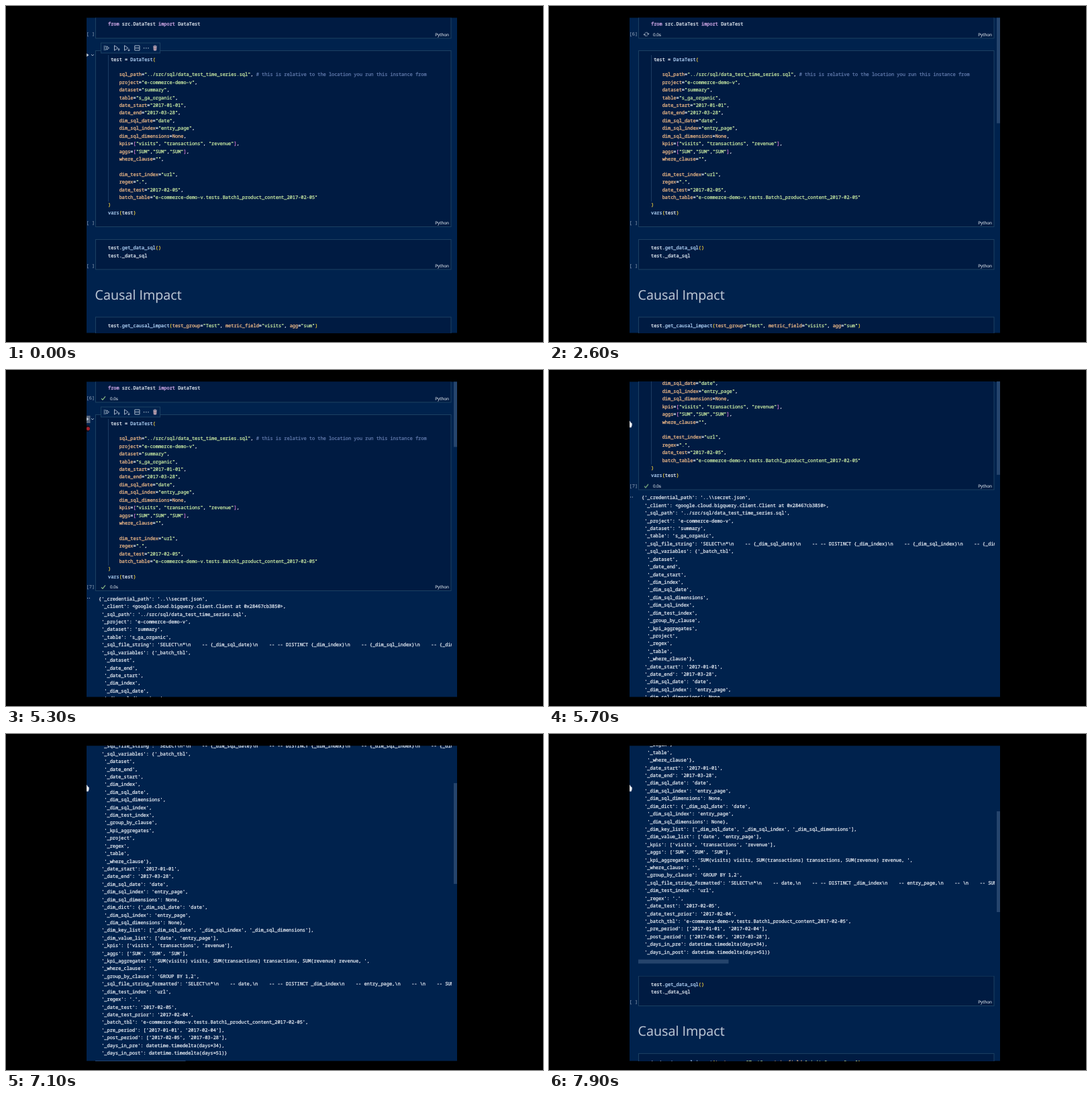
An HTML page for the animation above (8000 ms loop, 800 by 500 pixels).

```html
<!DOCTYPE html>
<html lang="en">
<head>
<meta charset="utf-8">
<title>Notebook run</title>
<style>
@property --n { syntax: "<integer>"; inherits: true; initial-value: 0; }

html, body { margin: 0; width: 100%; height: 100%; overflow: hidden; background: #000; }
svg { display: block; width: 800px; height: 500px; --n: 0; }
text { white-space: pre; text-rendering: geometricPrecision; }

/* a hairline stroke gives the small type its weight */
text, tspan { fill: currentColor; stroke: currentColor; stroke-width: .12; }
.code text, .code tspan { stroke-width: .28; }
.code text, .num { font: 500 6.94px "Noto Sans Mono", "DejaVu Sans Mono", monospace; color: #e1e7f0; }
.num { color: #8394ac; font-weight: 400; }
.ui { font: 6.3px "Open Sans", "Noto Sans", sans-serif; color: #d3dae4; }
.title { font: 19.7px "Open Sans", "Noto Sans", sans-serif; color: #bcc6d4; }
.cell { fill: #001b42; stroke: #1c4062; stroke-width: 1; }
.icon { fill: none; stroke: #b9c5d4; stroke-width: .9; }
.tick { fill: none; stroke: #8fc48a; stroke-width: 1.1; }
.bar { fill: #25446c; }

.kw { color: #dcb0f0; }
.str { color: #c6e6a2; }
.arg { color: #eeb887; }
.fn { color: #b0d0f5; }
.note { color: #5f78aa; }
.paren { color: #e8c93c; }
.brack { color: #cf74cc; }

/* the small negative delay keeps hard changes clear of the 100 ms marks */
.a, svg { animation: 8s step-end -30ms infinite; }
svg { animation-name: scroll; }
.doc { transform: translateY(calc(var(--n) * -30.08px)); }
.thumb { transform: translateY(calc(var(--n) * 8.39px)); }
.hover { animation-name: hover; animation-timing-function: linear; }
.rail { animation-name: rail; animation-timing-function: linear; }
.idle0 { animation-name: idle0; }
.used0 { animation-name: used0; }
.busy0 { animation-name: busy0; }
.done0 { animation-name: done0; }
.idle1 { animation-name: idle1; }
.used1 { animation-name: used1; }
.busy1 { animation-name: busy1; }
.before { animation-name: before; }
.after { animation-name: after; }
.below { animation-name: below; }
.press { animation-name: press; }
.hand { animation-name: hand; }
.mark { animation-name: mark; }
.spin { transform-box: view-box; animation: spin 1s linear infinite; }

@keyframes scroll {
  0% { --n: 0 } 67.5% { --n: 1 } 68.75% { --n: 2 } 70% { --n: 4 } 71.25% { --n: 5 }
  72.5% { --n: 6 } 73.75% { --n: 7 } 78.75% { --n: 8 } 80% { --n: 9 } 81.25% { --n: 10 }
  82.5% { --n: 11 } 83.75% { --n: 12 } 88.75% { --n: 13 } 90% { --n: 14 } 91.25% { --n: 15 }
  92.5% { --n: 16 } 93.75% { --n: 17 } 98.75%, 100% { --n: 18 }
}
@keyframes hover { 0%, 9% { opacity: 1 } 11.25%, 40% { opacity: 0 } 42.5%, 100% { opacity: 1 } }
@keyframes rail { 0%, 9% { opacity: 0 } 13.75%, 100% { opacity: 1 } }
@keyframes idle0 { 0% { opacity: 1 } 26.25%, 100% { opacity: 0 } }
@keyframes used0 { 0% { opacity: 0 } 26.25%, 100% { opacity: 1 } }
@keyframes busy0 { 0% { opacity: 0 } 26.25% { opacity: 1 } 36.25%, 100% { opacity: 0 } }
@keyframes done0 { 0% { opacity: 0 } 36.25%, 100% { opacity: 1 } }
@keyframes idle1 { 0% { opacity: 1 } 52.5%, 100% { opacity: 0 } }
@keyframes used1 { 0% { opacity: 0 } 52.5%, 100% { opacity: 1 } }
@keyframes busy1 { 0% { opacity: 0 } 52.5% { opacity: 1 } 56.25%, 100% { opacity: 0 } }
@keyframes before { 0% { opacity: 1 } 56.25%, 100% { opacity: 0 } }
@keyframes after { 0% { opacity: 0 } 56.25%, 100% { opacity: 1 } }
@keyframes below { 0% { transform: none } 56.25%, 100% { transform: translateY(554px) } }
@keyframes press { 0% { opacity: 0 } 47.5%, 100% { opacity: 1 } }
@keyframes hand { 0% { opacity: 0 } 47.5% { opacity: 1 } 52.5% { opacity: 0 } 67.5%, 100% { opacity: 1 } }
@keyframes mark { 0% { opacity: 0 } 52.5% { opacity: 1 } 67.5%, 100% { opacity: 0 } }
@keyframes spin { to { transform: rotate(360deg) } }
</style>
</head>
<body>
<svg viewBox="0 0 800 500">
  <defs>
    <clipPath id="view"><rect x="120" y="17.5" width="552" height="469"/></clipPath>
    <clipPath id="wide"><rect x="133" y="330" width="531" height="560"/></clipPath>
    <path id="check" class="tick" d="M-3 .3 L-1 2.4 L3 -2.6"/>
    <g id="sync" class="icon">
      <path d="M-2.6 -.6 A2.7 2.7 0 0 1 2.2 -1.6 M2.6 .6 A2.7 2.7 0 0 1 -2.2 1.6"/>
      <path d="M2.5 -3.2 V-1.2 H.7 M-2.5 3.2 V1.2 H-.7"/>
    </g>
  </defs>
  <g clip-path="url(#view)">
    <rect x="120" y="17" width="552" height="470" fill="#00224d"/>
    <g class="doc">
      <rect class="cell" x="133.5" y="-20" width="529.5" height="68"/>
      <g id="imports" class="code"></g>
      <text class="ui" x="660" y="44.5" text-anchor="end">Python</text>
      <text class="num a idle0" x="119.6" y="44.3">[ ]</text>
      <g class="a used0">
        <text class="num" x="119.6" y="44.3">[6]</text>
        <text class="ui" x="155" y="44.5">0.0s</text>
      </g>
      <g transform="translate(145 42)">
        <g class="a busy0"><g class="spin"><use href="#sync"/></g></g>
        <use class="a done0" href="#check"/>
      </g>

      <rect class="cell" x="133.5" y="66.5" width="529.5" height="262"/>
      <path d="M152.5 73 V291" stroke="#24456b" stroke-width=".8"/>
      <g id="setup" class="code"></g>
      <text class="ui" x="660" y="325.3" text-anchor="end">Python</text>
      <text class="num a idle1" x="119.6" y="325.2">[ ]</text>
      <g class="a used1">
        <text class="num" x="119.6" y="325.2">[7]</text>
        <text class="ui" x="155" y="325.3">0.0s</text>
      </g>
      <g transform="translate(145 323)">
        <g class="a busy1"><g class="spin"><use href="#sync"/></g></g>
        <use class="a after" href="#check"/>
      </g>

      <g class="a hover">
        <rect class="a press" x="119" y="68" width="6.5" height="11" fill="#59687f"/>
        <path d="M120 70.5 L123.6 73 L120 75.5 Z" fill="#b9c5d4"/>
        <path class="icon" d="M127 72 L128.9 74 L130.8 72"/>
        <rect x="141.5" y="55" width="88" height="15" fill="#00224d" stroke="#1c4062"/>
        <g class="icon">
          <path d="M145.5 60 H149 M145.5 62.5 H148 M145.5 65 H149 M150 59.8 L153.5 62.5 L150 65.2 Z"/>
          <path d="M161.5 58.8 L166.8 62.5 L161.5 66.2 Z M168 67 V63.5 M166.6 65 L168 63.5 L169.4 65"/>
          <path d="M176.5 58.8 L181.8 62.5 L176.5 66.2 Z M183 63.5 V67 M181.6 65.5 L183 67 L184.4 65.5"/>
          <path d="M191.8 59 H199 V66 H191.8 Z M191.8 62.5 H199"/>
          <path d="M205 62.7 h1.2 M208.2 62.7 h1.2 M211.4 62.7 h1.2" stroke-width="1.2"/>
        </g>
        <path d="M219 60 H225 M220.8 59 H223.2 M220 61 L220.4 66 H223.6 L224 61 Z"
              stroke="#d5b7c4" fill="#9c8798" stroke-width=".9"/>
      </g>

      <g class="a after">
        <path class="icon" d="M121 339.5 h1.2 M123.8 339.5 h1.2" stroke-width="1.2"/>
        <g id="output" class="code" clip-path="url(#wide)"></g>
        <rect class="bar" x="133" y="877" width="134.5" height="6"/>
      </g>

      <g class="a below">
        <rect class="cell" x="133.5" y="347.5" width="529.5" height="44.5"/>
        <g id="fetch" class="code"></g>
        <text class="num" x="119.6" y="388.5">[ ]</text>
        <text class="ui" x="660" y="388.8" text-anchor="end">Python</text>
        <text class="title" x="132.6" y="436.5">Causal Impact</text>
        <rect class="cell" x="133.5" y="463" width="529.5" height="60"/>
        <g id="impact" class="code"></g>
      </g>
    </g>

    <g class="a rail">
      <rect class="bar a before" x="667" y="17" width="5" height="157"/>
      <g class="a after"><rect class="bar thumb" x="667" y="-36" width="5" height="150"/></g>
    </g>
    <path class="a hand" fill="#e6ebf2" d="M119 78 L120.6 75.5 L121.6 78 L123.6 79.2 L123.8 82 L122.6 85.5 H119 Z"/>
    <g class="a mark">
      <path fill="#15101c" d="M119 83 L122.5 82 L125 84.5 L125.2 88 L123 92 H119 Z"/>
      <circle cx="122.3" cy="87.3" r="2.6" fill="#a5202c"/>
    </g>
  </g>
</svg>
<script>
const NS = "http://www.w3.org/2000/svg";
const PITCH = 11.42;
const KINDS = ["note", "str", "kw", "arg", "fn", "paren", "brack"];
const TOKEN = /(#.*)|("[^"]*")|\b(from|import)\b|(\bNone\b|\w+(?==))|(\w+(?=\())|([()])|([[\]])|[^\w"#()[\]]+|\w+/g;

function add(parent, tag, text, attrs) {
  const node = document.createElementNS(NS, tag);
  for (const key in attrs) node.setAttribute(key, attrs[key]);
  node.textContent = text;
  return parent.appendChild(node);
}

function write(id, x, y, source, colour = true) {
  const group = document.getElementById(id);
  source.split("\n").forEach((line, row) => {
    const text = add(group, "text", colour ? "" : line, { x, y: y + row * PITCH });
    if (!colour) return;
    for (const m of line.matchAll(TOKEN)) {
      const kind = KINDS.find((_, i) => m[i + 1]);
      add(text, "tspan", m[0], kind ? { class: kind } : {});
    }
  });
}

write("imports", 152, 29.3, "from src.DataTest import DataTest");

write("setup", 152, 81.5, ` test = DataTest(

    sql_path="../src/sql/data_test_time_series.sql", # this is relative to the location you run this instance from
    project="e-commerce-demo-v",
    dataset="summary",
    table="s_ga_organic",
    date_start="2017-01-01",
    date_end="2017-03-28",
    dim_sql_date="date",
    dim_sql_index="entry_page",
    dim_sql_dimensions=None,
    kpis=["visits", "transactions", "revenue"],
    aggs=["SUM","SUM","SUM"],
    where_clause="",

    dim_test_index="url",
    regex=".",
    date_test="2017-02-05",
    batch_table="e-commerce-demo-v.tests.Batch1_product_content_2017-02-05"
)
vars(test)`);

write("fetch", 152, 362.3, "test.get_data_sql()\ntest._data_sql");
write("impact", 152, 478.2, 'test.get_causal_impact(test_group="Test", metric_field="visits", agg="sum")');

write("output", 138, 342.8, String.raw`{'_credential_path': '..\\secret.json',
 '_client': <google.cloud.bigquery.client.Client at 0x28467cb3850>,
 '_sql_path': '../src/sql/data_test_time_series.sql',
 '_project': 'e-commerce-demo-v',
 '_dataset': 'summary',
 '_table': 's_ga_organic',
 '_sql_file_string': 'SELECT\n*\n    -- {_dim_sql_date}\n    -- -- DISTINCT {_dim_index}\n    -- {_dim_sql_index}\n    -- {_dim_sql
 '_sql_variables': {'_batch_tbl',
  '_dataset',
  '_date_end',
  '_date_start',
  '_dim_index',
  '_dim_sql_date',
  '_dim_sql_dimensions',
  '_dim_sql_index',
  '_dim_test_index',
  '_group_by_clause',
  '_kpi_aggregates',
  '_project',
  '_regex',
  '_table',
  '_where_clause'},
 '_date_start': '2017-01-01',
 '_date_end': '2017-03-28',
 '_dim_sql_date': 'date',
 '_dim_sql_index': 'entry_page',
 '_dim_sql_dimensions': None,
 '_dim_dict': {'_dim_sql_date': 'date',
  '_dim_sql_index': 'entry_page',
  '_dim_sql_dimensions': None},
 '_dim_key_list': ['_dim_sql_date', '_dim_sql_index', '_dim_sql_dimensions'],
 '_dim_value_list': ['date', 'entry_page'],
 '_kpis': ['visits', 'transactions', 'revenue'],
 '_aggs': ['SUM', 'SUM', 'SUM'],
 '_kpi_aggregates': 'SUM(visits) visits, SUM(transactions) transactions, SUM(revenue) revenue, ',
 '_where_clause': '',
 '_group_by_clause': 'GROUP BY 1,2',
 '_sql_file_string_formatted': 'SELECT\n*\n    -- date,\n    -- -- DISTINCT _dim_index\n    -- entry_page,\n    -- \n    -- SUM(visits)
 '_dim_test_index': 'url',
 '_regex': '.',
 '_date_test': '2017-02-05',
 '_date_test_prior': '2017-02-04',
 '_batch_tbl': 'e-commerce-demo-v.tests.Batch1_product_content_2017-02-05',
 '_pre_period': ['2017-01-01', '2017-02-04'],
 '_post_period': ['2017-02-05', '2017-03-28'],
 '_days_in_pre': datetime.timedelta(days=34),
 '_days_in_post': datetime.timedelta(days=51)}`, false);
</script>
</body>
</html>
```
